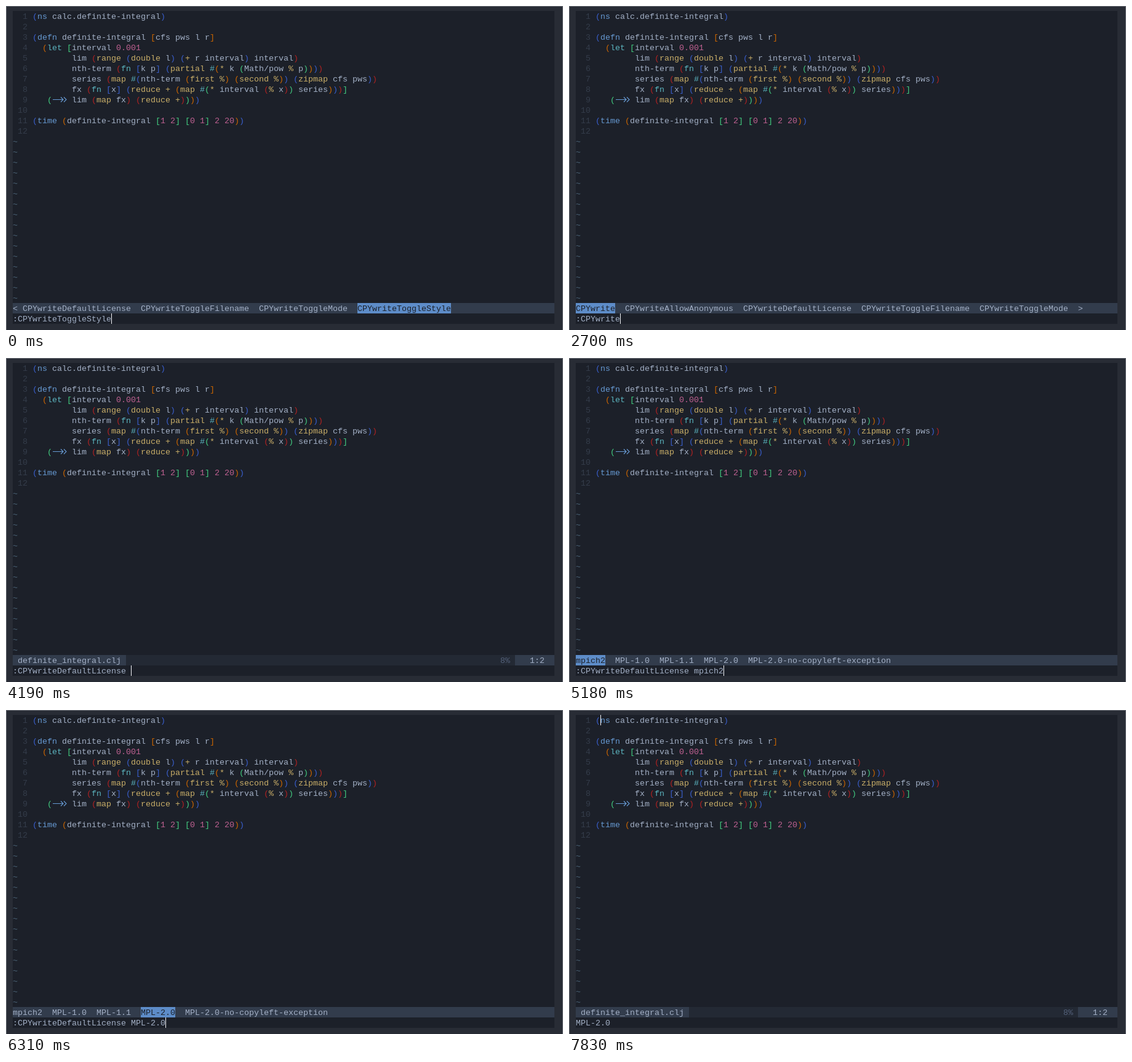
These frames come from a looping animation (905 px wide and 528 px high, 8 s). An HTML page with a canvas:

```html
<!DOCTYPE html>
<html lang="en">
<head>
<meta charset="utf-8">
<title>Command completion</title>
<style>
html, body { margin: 0; height: 100%; overflow: hidden; background: #282c35; }
canvas { display: block; }
</style>
</head>
<body>
<canvas id="stage" width="905" height="528"></canvas>
<script>
const ctx = document.getElementById('stage').getContext('2d');
const LOOP = 8000;
const LEFT = 11, TOP = 8, CELL = 8, ROW = 17, COLS = 110;
const STATUS_ROW = 28, COMMAND_ROW = 29;

const color = {
  frame: '#282c35', edge: '#6c7077', back: '#1c2029', text: '#a3b0c6',
  lineNumber: '#343c4a', tilde: '#4c6377', bar: '#323c4c', barMiddle: '#232934',
  selected: '#5d8cc8', dim: '#536079', cursor: '#f4f6fa',
  define: '#6699d2', special: '#5cb5c0', builtin: '#c9ae68', number: '#bd6090'
};
const rainbow = ['#3a5fcd', '#cd6600', '#43cd80', '#b22222'];

const code = `(ns calc.definite-integral)

(defn definite-integral [cfs pws l r]
  (let [interval 0.001
        lim (range (double l) (+ r interval) interval)
        nth-term (fn [k p] (partial #(* k (Math/pow % p))))
        series (map #(nth-term (first %) (second %)) (zipmap cfs pws))
        fx (fn [x] (reduce + (map #(* interval (% x)) series)))]
   (->> lim (map fx) (reduce +))))

(time (definite-integral [1 2] [0 1] 2 20))
`.split('\n');

const commands = ['', 'AllowAnonymous', 'DefaultLicense', 'ToggleFilename', 'ToggleMode', 'ToggleStyle']
  .map(suffix => 'CPYwrite' + suffix);
const licenses = ['mpich2', 'MPL-1.0', 'MPL-1.1', 'MPL-2.0', 'MPL-2.0-no-copyleft-exception'];
const setLicense = ':CPYwriteDefaultLicense ';

const pick = (index, cursor = true) => ({
  items: [...commands.slice(0, 5), '>'], index, cursor,
  command: ':' + (index < 0 ? 'CPY' : commands[index])
});
const pickLast = cursor => ({
  items: commands.slice(2), index: 3, before: '< ', command: ':' + commands[5], cursor
});
const pickLicense = index => ({
  items: licenses, index, command: setLicense + licenses[index], cursor: true
});
const type = text => ({ command: setLicense + text, cursor: true });
const finished = cursor => ({ command: 'MPL-2.0', cursor, inBuffer: true });

const timeline = [
  [0, pickLast(true)], [590, pickLast(false)], [1180, pickLast(true)], [1740, pickLast(false)],
  [2020, pick(-1, false)], [2150, pick(-1)], [2700, pick(0)],
  [2830, pick(1, false)], [2960, pick(1)], [3360, pick(2)],
  [4190, type('')], [4590, type('m')], [4860, type('mp')],
  [5180, pickLicense(0)], [5740, pickLicense(1)], [5880, pickLicense(2)], [6310, pickLicense(3)],
  [6590, finished(true)], [7280, finished(false)], [7830, finished(true)]
];

function cells(col, row, width, fill, height = 1) {
  ctx.fillStyle = fill;
  ctx.fillRect(LEFT + col * CELL, TOP + row * ROW, width * CELL, height * ROW);
}

function write(text, col, row, fill = color.text) {
  ctx.fillStyle = fill;
  ctx.fillText(text, LEFT + col * CELL, TOP + row * ROW + 13);
}

function arrow(col, row) {
  const x = LEFT + col * CELL, y = TOP + row * ROW + 8.5;
  ctx.strokeStyle = color.define;
  ctx.lineWidth = 1.1;
  ctx.beginPath();
  ctx.moveTo(x + 1, y);
  ctx.lineTo(x + 18, y);
  for (const tip of [18, 23]) {
    ctx.moveTo(x + tip - 4, y - 4);
    ctx.lineTo(x + tip, y);
    ctx.lineTo(x + tip - 4, y + 4);
  }
  ctx.stroke();
}

function tokenColor(token) {
  if (/^(ns|defn|time)$/.test(token)) return color.define;
  if (/^(let|fn|#)$/.test(token)) return color.special;
  if (/^(range|double|partial|map|first|second|zipmap|reduce|[+*%])$/.test(token)) return color.builtin;
  return /^\d/.test(token) ? color.number : color.text;
}

function drawCode() {
  let depth = 0;
  code.forEach((line, row) => {
    write(String(row + 1).padStart(3), 0, row, color.lineNumber);
    for (const { 0: token, index } of line.matchAll(/[()[\]#]|[^\s()[\]#]+/g)) {
      const col = index + 4;
      if (token === '->>') arrow(col, row);
      else if (/[([]/.test(token)) write(token, col, row, rainbow[depth++ % 4]);
      else if (/[)\]]/.test(token)) write(token, col, row, rainbow[--depth % 4]);
      else write(token, col, row, tokenColor(token));
    }
  });
  for (let row = code.length; row < STATUS_ROW; row++) write('~', 0, row, color.tilde);
}

function drawMenu({ items, index, before = '' }) {
  cells(0, STATUS_ROW, COLS, color.bar);
  write(before, 0, STATUS_ROW);
  let col = before.length;
  items.forEach((item, i) => {
    if (i === index) cells(col, STATUS_ROW, item.length, color.selected);
    write(item, col, STATUS_ROW, i === index ? color.back : color.text);
    col += item.length + 2;
  });
}

function drawStatus() {
  cells(0, STATUS_ROW, COLS, color.barMiddle);
  cells(0, STATUS_ROW, 23, color.bar);
  cells(102, STATUS_ROW, 8, color.bar);
  write('definite_integral.clj', 1, STATUS_ROW);
  write('8%', 99, STATUS_ROW, color.dim);
  write('1:2', 105, STATUS_ROW);
}

function draw(now) {
  const time = now % LOOP;
  const state = timeline.findLast(([start]) => start <= time)[1];
  ctx.font = '13.333px "Liberation Mono", monospace';
  ctx.fillStyle = color.edge;
  ctx.fillRect(0, 0, 905, 528);
  ctx.fillStyle = color.frame;
  ctx.fillRect(1, 1, 903, 527);
  cells(0, 0, COLS, color.back, 30);
  drawCode();
  if (state.items) drawMenu(state);
  else drawStatus();
  write(state.command, 0, COMMAND_ROW);
  if (state.cursor) {
    if (state.inBuffer) cells(5, 0, 1 / CELL, color.cursor);
    else cells(state.command.length, COMMAND_ROW, 1 / CELL, color.cursor);
  }
  requestAnimationFrame(draw);
}
draw(0);
</script>
</body>
</html>
```
